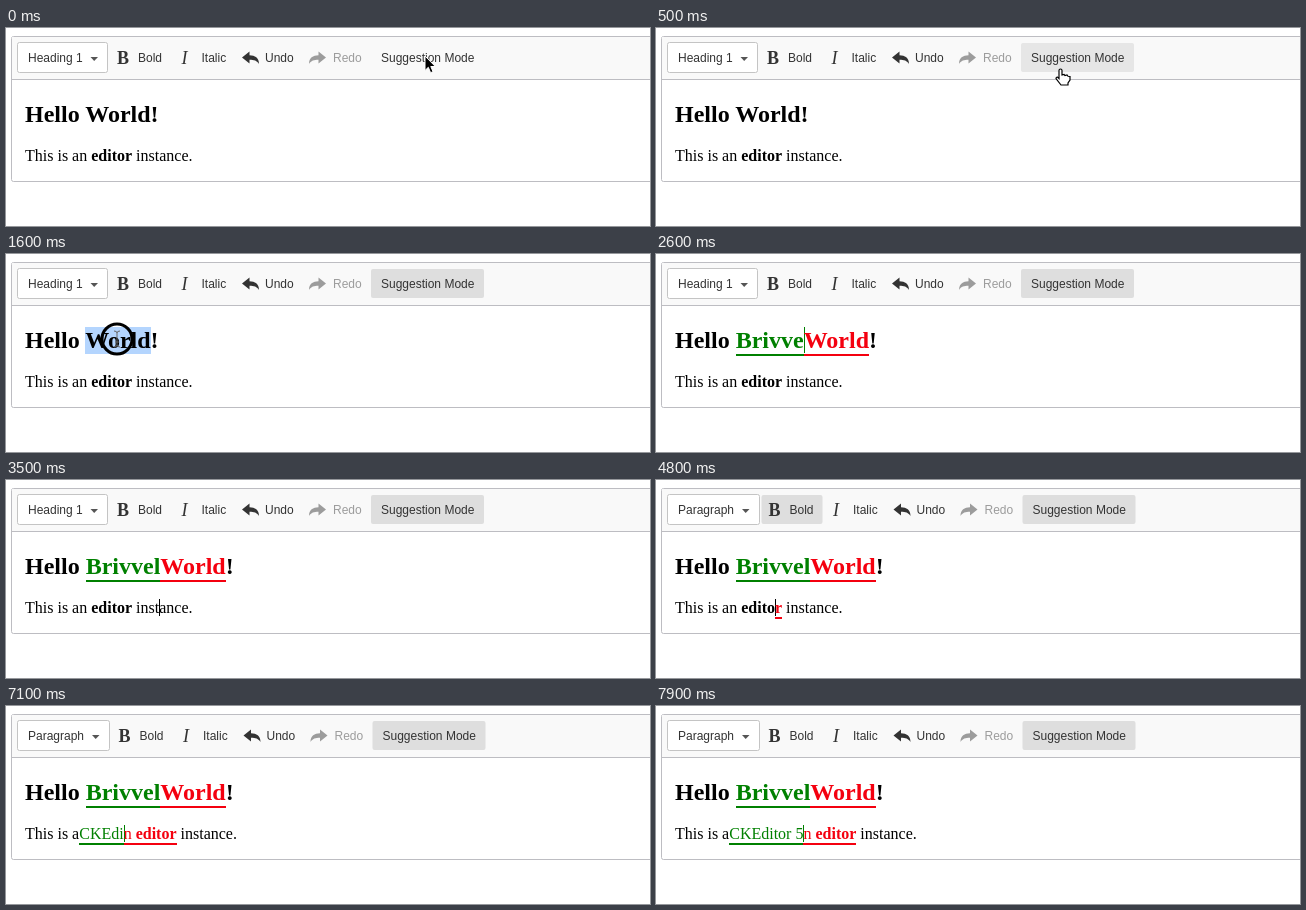
These frames come from a looping animation (644x198 px, 8000 ms). An HTML page:

```html
<!DOCTYPE html>
<html lang="en">
<head>
<meta charset="utf-8">
<title>Suggestion mode</title>
<style>
html, body { margin: 0; width: 644px; height: 198px; overflow: hidden; background: #fff; }
svg, h2, p { position: absolute; margin: 0; left: 0; top: 0; }
svg { font: 12px "Liberation Sans", Arial, sans-serif; fill: #333; }
h2, p { left: 19px; white-space: pre; color: #000; font-family: "Liberation Serif", Times, serif; }
h2 { top: 72px; font-size: 24px; line-height: 28px; }
p { top: 119px; font-size: 16px; line-height: 18px; }
h2 span, p span { padding-bottom: 1px; }
.sel { background: #b4d5fe; }
.add { color: #008000; border-bottom: 2px solid; }
.del { color: #f4000f; border-bottom: 2px solid; }
i { border-left: 1px solid; margin-right: -1px; }
i.off { border-color: transparent; }
.icon { font: bold 18px "Liberation Serif", Times, serif; }
</style>
</head>
<body>
<svg width="644" height="198">
  <rect x="5.5" y="8.5" width="660" height="145" rx="2" fill="#fff" stroke="#bdbdc2"/>
  <path d="M6 9H644V51H6Z" fill="#f9f9f9"/>
  <path d="M6 51.5H644" stroke="#bdbdc2"/>
  <rect id="box" x="11.5" y="14.5" width="90" height="30" rx="2" fill="#fff" stroke="#c4c4c4"/>
  <text id="style" x="22" y="34"></text>
  <g id="tools">
    <path d="M84.5 29H92L88.2 33Z" fill="#555"/>
    <rect id="boldBg" x="104" y="15" width="61" height="29" rx="2" fill="#dedede"/>
    <text class="icon" x="111" y="36">B</text>
    <text x="132" y="34">Bold</text>
    <text class="icon" x="175.5" y="36" style="font-weight:400;font-style:italic">I</text>
    <text x="195.5" y="34">Italic</text>
    <path id="arrow" d="M236 29.5L243.5 23.5V27.3C249 27.3 253 30 253 36C251 32.5 248 31.7 243.5 31.7V35.5Z"/>
    <text x="259" y="34">Undo</text>
    <g fill="#9c9c9c">
      <use href="#arrow" transform="translate(556) scale(-1 1)"/>
      <text x="327" y="34">Redo</text>
    </g>
    <rect id="modeBg" x="365" y="15" width="113" height="29" rx="2"/>
    <text x="375" y="34">Suggestion Mode</text>
  </g>
</svg>
<h2 id="head"></h2>
<p id="para"></p>
<svg width="644" height="198">
  <g id="mouse">
    <path id="pointer" d="M0 0V14.5L3.3 11.3L5.6 16.7L8 15.7L5.8 10.5H10.3Z" fill="#000" stroke="#fff"/>
    <path id="hand" d="M-2 1.5Q-2 0-.5 0T1 1.5V6L3 5.5 4 6.5 6 6 7 7.3 9 7.5V11L7 14V16H0L-5 9.5Q-5 8-3.5 8L-2 9.5Z" fill="#fff" stroke="#000" stroke-width="1.2"/>
    <path id="beam" d="M-3-8Q0-8 0-6Q0-8 3-8M0-6V6M-3 8Q0 8 0 6Q0 8 3 8M-2 3H2" fill="none" stroke="#666"/>
    <circle id="ring" r="15" fill="none" stroke="#000" stroke-width="3"/>
  </g>
</svg>
<script>
const LOOP = 8000;
const WORD = 'Brivvel', NAME = 'CKEditor 5', TEXT = 'This is an editor instance.';
const BOLD = 11, BOLD_END = 17, START = 22;
const DOWN = 3480, PARAGRAPH = 3580;
const wordKeys = [...WORD].map((_, n) => 1980 + n * 120);
// five steps left, then eight backspaces
const caretKeys = [3790, 3890, 4040, 4190, 4290, 4790, 4970, 5150, 5330, 5510, 5690, 5890, 6090];
const nameKeys = [6590, 6690, 6790, 6940, 7090, 7250, 7450, 7600, 7750, 7850];
const allKeys = [...wordKeys, DOWN, ...caretKeys, ...nameKeys];
const path = [[100, 419, 28], [450, 405, 41], [800, 405, 41], [1300, 111, 85]];

const $ = id => document.getElementById(id);
const show = (id, on) => $(id).setAttribute('display', on ? 'inline' : 'none');
const count = (keys, t) => keys.filter(k => k <= t).length;
const within = (t, a, b) => t >= a && t < b;
const span = (kind, html) => html && `<span class="${kind}">${html}</span>`;

// part of the paragraph, keeping the bold word bold
function part(a, b) {
  const bold = TEXT.slice(Math.max(a, BOLD), Math.min(b, BOLD_END));
  return TEXT.slice(a, Math.min(b, BOLD)) + (bold && `<b>${bold}</b>`) + TEXT.slice(Math.max(a, BOLD_END), b);
}

function mouseAt(t) {
  let [, x, y] = path[0];
  for (let n = 1; n < path.length; n++) {
    const [t0, x0, y0] = path[n - 1], [t1, x1, y1] = path[n];
    if (t < t0) break;
    const k = Math.min(1, (t - t0) / (t1 - t0)), e = k * k * (3 - 2 * k);
    x = x0 + (x1 - x0) * e;
    y = y0 + (y1 - y0) * e;
  }
  return [x, y];
}

function drawText(t) {
  const last = Math.max(0, ...allKeys.filter(k => k <= t));
  const caret = `<i class="${(t - last) % 1000 < 520 ? '' : 'off'}"></i>`;

  const typed = WORD.slice(0, count(wordKeys, t));
  const added = typed && span('add', typed + (t < DOWN ? caret : ''));
  const kind = typed ? 'del' : t >= 1480 ? 'sel' : '';
  $('head').innerHTML = 'Hello ' + added + span(kind, 'World') + '!';

  const pos = START - count(caretKeys, t);
  const name = NAME.slice(0, count(nameKeys, t));
  const here = t < DOWN ? '' : name ? span('add', name + caret) : caret;
  $('para').innerHTML = part(0, pos) + here + span('del', part(pos, BOLD_END)) + part(Math.max(pos, BOLD_END), TEXT.length);
  show('boldBg', pos > BOLD && pos < BOLD_END);
}

function drawToolbar(t) {
  const para = t >= PARAGRAPH;
  $('style').textContent = para ? 'Paragraph' : 'Heading 1';
  $('box').setAttribute('width', para ? 92 : 90);
  $('tools').setAttribute('transform', `translate(${para ? 1.5 : 0})`);
  $('modeBg').setAttribute('fill', t < 150 ? 'none' : t < 600 ? '#e6e6e6' : '#dedede');
}

function drawMouse(t) {
  const [x, y] = mouseAt(t);
  const overButton = t >= 150 && x > 365 && y < 46, overText = y > 53;
  $('mouse').setAttribute('transform', `translate(${x} ${y})`);
  show('mouse', t < 1900);
  show('hand', overButton);
  show('beam', overText);
  show('pointer', !overButton && !overText);
  show('ring', within(t, 600, 800) || within(t, 1400, 1750));
}

function frame(now) {
  const t = now % LOOP;
  drawText(t);
  drawToolbar(t);
  drawMouse(t);
  requestAnimationFrame(frame);
}
requestAnimationFrame(frame);
</script>
</body>
</html>
```
